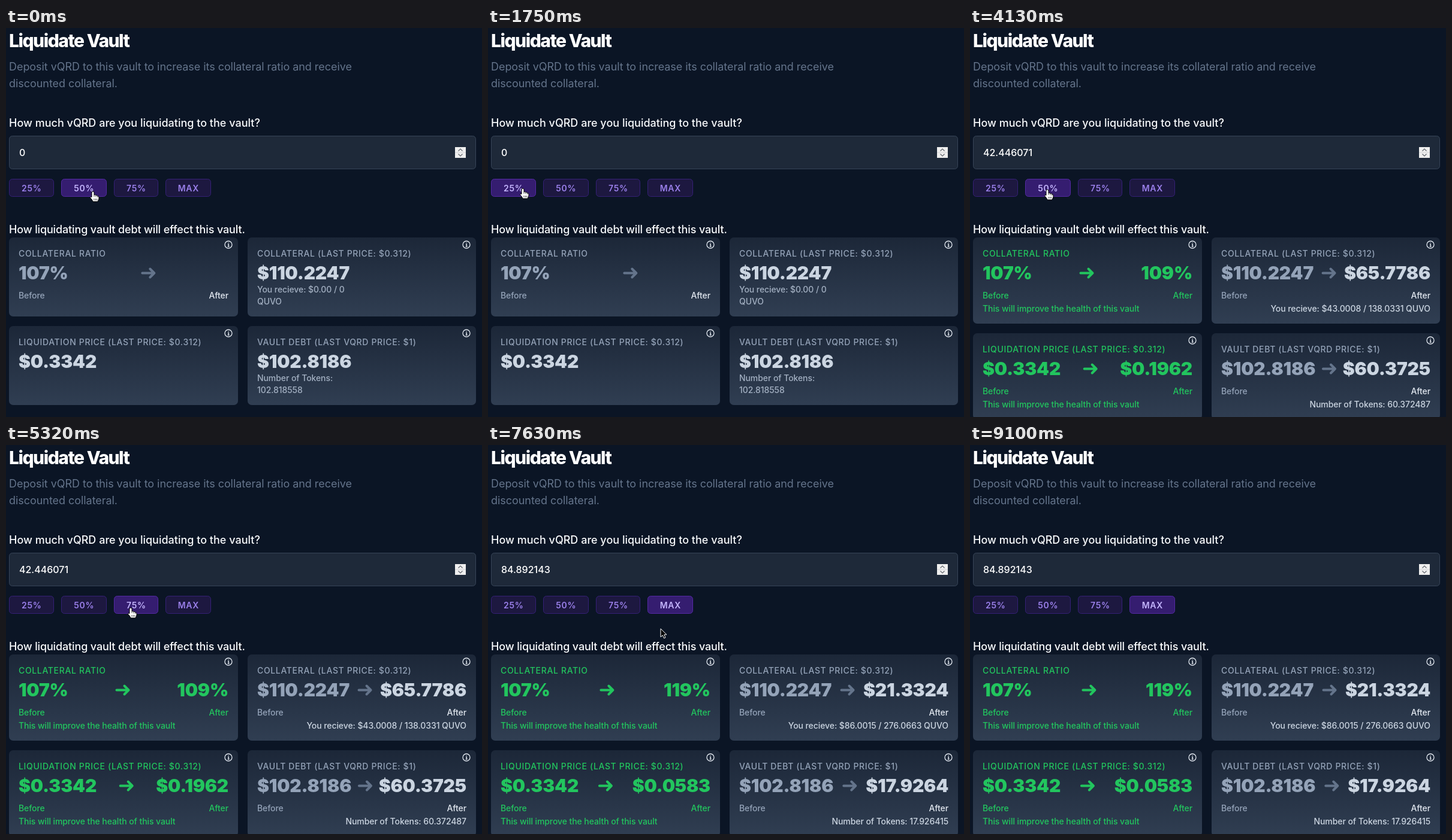
An HTML page that plays this animation: 794x650 px, repeating every 9170 ms.

```html
<!DOCTYPE html>
<html lang="en">
<head>
<meta charset="utf-8">
<title>Liquidate Vault</title>
<style>
html, body { margin: 0; width: 100%; height: 100%; overflow: hidden; background: #0b1525; }
svg { display: block; width: 794px; height: 650px; }
text { font-family: Inter, "Open Sans", sans-serif; font-weight: 500; font-optical-sizing: none; white-space: pre; }
.title { font-size: 30px; font-weight: 800; letter-spacing: -.05em; fill: #fff; }
.lead { font-size: 18px; font-weight: 400; letter-spacing: -.05px; fill: #64748b; }
.head { font-size: 18px; fill: #f8fafc; }
.tight { letter-spacing: -.14px; }
.input { font-size: 16px; fill: #fff; }
.btn { font-size: 14px; font-weight: 600; letter-spacing: .05em; text-anchor: middle; }
.cap { font-size: 14px; letter-spacing: .65px; }
.big { font-size: 30px; font-weight: 900; letter-spacing: -.2px; }
.small { font-size: 14px; letter-spacing: -.08px; }
.tip { font-size: 14px; letter-spacing: .4px; fill: #0f172a; }
</style>
</head>
<body>
<svg viewBox="0 0 794 650">
  <defs>
    <linearGradient id="shade" x2="0" y2="1">
      <stop stop-color="#1c2738"/><stop offset="1" stop-color="#303e52"/>
    </linearGradient>
  </defs>
  <rect width="794" height="650" fill="#0b1525"/>
  <text class="title" x="5" y="32">Liquidate Vault</text>
  <text class="lead" x="5" y="71">Deposit vQRD to this vault to increase its collateral ratio and receive</text>
  <text class="lead" x="5" y="99">discounted collateral.</text>
  <text class="head" x="5" y="165">How much vQRD are you liquidating to the vault?</text>
  <rect x="5.5" y="180.5" width="778" height="55" rx="5" fill="#1e2939" stroke="#374457"/>
  <text class="input" id="amount" x="22" y="214"></text>
  <rect x="749" y="199" width="18" height="18" fill="#efefef"/>
  <path d="M749 208H767" stroke="#d4d4d8"/>
  <path d="M754.5 205.5L758 202L761.5 205.5M754.5 210.5L758 214L761.5 210.5" fill="none" stroke="#62666d" stroke-width="1.2"/>
  <g id="buttons"></g>
  <text class="head tight" x="5" y="343">How liquidating vault debt will effect this vault.</text>
  <g id="cards"></g>
  <g id="tooltip">
    <path d="M190 339L196 345L202 339Z" fill="#94a3b8"/>
    <rect x="5" y="292" width="382" height="48" rx="5" fill="#94a3b8"/>
    <text class="tip" x="21" y="314">This is the collateral ratio of this vault. It can be</text>
    <text class="tip" x="21" y="330">liquidated up to 120%</text>
  </g>
  <g id="cursor">
    <g id="hand" transform="translate(1 1)" fill="#fff" stroke="#000" stroke-linejoin="round">
      <path d="M-2 1Q-2 -1 0 -1T2 1V5Q4 4 5 5.6Q7 5 7.8 6.8Q10 6.6 10 9V11Q9.500 13 8 16H0Q-1 13 -4.500 9.500Q-4.500 7 -2 8.500Z"/>
      <path d="M2 5V8M5 6V8.500M7.700 7V9M2 11V14M4.500 11V14M6.800 11V14" stroke-width=".7"/>
    </g>
    <path id="arrow" d="M0 0V14L3.300 11L5.500 16L8 15L5.800 10H10Z" fill="#000" stroke="#fff"/>
    <g id="help">
      <circle r="7.300" fill="#000" stroke="#fff" stroke-width="1.300"/>
      <text y="4.700" text-anchor="middle" font-size="13" style="font-weight:700" fill="#fff">?</text>
    </g>
  </g>
</svg>
<script>
const LOOP = 9170;
const GREEN = '#22c55e', MUTED = '#94a3b8', LIGHT = '#cbd5e1', DIM = '#64748b', PALE = '#e2e8f0';
const $ = id => document.getElementById(id);

const steps = [
  { at: 0, amount: '0' },
  { at: 2450, amount: '21.223035', ratio: '108%', price: '$0.2652', coll: '$88.0017', get: '$21.5004 / 69.0166', debt: '$81.5955', tokens: '81.595523' },
  { at: 4100, amount: '42.446071', ratio: '109%', price: '$0.1962', coll: '$65.7786', get: '$43.0008 / 138.0331', debt: '$60.3725', tokens: '60.372487' },
  { at: 5750, amount: '63.669107', ratio: '111%', price: '$0.1272', coll: '$43.5555', get: '$64.5012 / 207.0497', debt: '$39.1495', tokens: '39.149451' },
  { at: 7250, amount: '84.892143', ratio: '119%', price: '$0.0583', coll: '$21.3324', get: '$86.0015 / 276.0663', debt: '$17.9264', tokens: '17.926415' }
];

const buttons = [['25%', 5, 75], ['50%', 92, 76], ['75%', 180, 74], ['MAX', 266, 76]];

// Pointer stops: time, x, y
const path = [
  [0, 144, 273], [700, 144, 273], [1300, 57, 268], [2700, 57, 268],
  [3150, 80.6, 274], [3500, 128, 270], [4500, 128, 270], [5000, 207, 272],
  [6000, 207, 272], [6500, 279, 273], [7450, 279, 273], [7850, 300, 352],
  [8250, 327, 483], [8400, 327, 483], [8600, 345, 560], [8750, 360, 670], [LOOP, 360, 670]
];

const label = (cls, x, y, fill, str, end) =>
  `<text class="${cls}" x="${x}" y="${y}" fill="${fill}"${end ? ' text-anchor="end"' : ''}>${str}</text>`;

function card(x, y, w, h, title, tone, body) {
  return `<g transform="translate(${x} ${y})">
    <rect width="${w}" height="${h}" rx="7" fill="url(#shade)"/>
    <g transform="translate(${w - 16} 12)" fill="none" stroke="${PALE}" stroke-width="1.3">
      <circle r="6"/><path d="M-1 -.5H.3V3M-1.300 3H1.600M-.5 -2.800H.7"/>
    </g>
    ${label('cap', 16, 32, tone, title)}${body}</g>`;
}

// Before and after values with an arrow midway between them
function change(w, before, after, tones) {
  const [first, arrow, last] = tones;
  return label('big before', 16, 70, first, before) + label('big after', w - 16, 70, last, after, true) +
    `<path class="mid" d="M-10 0H10M3 -7L10 0L3 7" fill="none" stroke="${arrow}" stroke-width="4" stroke-linecap="round" stroke-linejoin="round"/>` +
    label('small', 16, 102, first, 'Before') + label('small', w - 16, 102, last === LIGHT ? PALE : last, 'After', true);
}

function drawCards(s) {
  const on = !!s.ratio, h = on ? 144 : 132, low = 350 + h + 16;
  const greens = [GREEN, GREEN, GREEN], greys = [MUTED, DIM, LIGHT];
  const tone = on ? GREEN : MUTED;
  const note = on ? label('small', 16, 124, GREEN, 'This will improve the health of this vault') : '';
  const left = (y, title, body) => card(5, y, 382, h, title, tone, body + note);
  const right = (y, title, body) => card(403, y, 381, h, title, MUTED, body);
  const asset = (before, after, note, lines) => on
    ? change(381, before, after, greys) + label('small', 365, 124, LIGHT, note, true)
    : label('big', 16, 70, LIGHT, before) + lines.map((t, i) => label('small', 16, 92 + 20 * i, '#a3b0c2', t)).join('');
  $('cards').innerHTML =
    left(350, 'COLLATERAL RATIO', change(382, '107%', s.ratio || '', on ? greens : greys)) +
    right(350, 'COLLATERAL (LAST PRICE: $0.312)',
      asset('$110.2247', s.coll, `You recieve: ${s.get} QUVO`, ['You recieve: $0.00 / 0', 'QUVO'])) +
    left(low, 'LIQUIDATION PRICE (LAST PRICE: $0.312)',
      on ? change(382, '$0.3342', s.price, greens) : label('big', 16, 70, LIGHT, '$0.3342')) +
    right(low, 'VAULT DEBT (LAST VQRD PRICE: $1)',
      asset('$102.8186', s.debt, `Number of Tokens: ${s.tokens}`, ['Number of Tokens:', '102.818558']));
  for (const mid of document.querySelectorAll('.mid')) {
    const g = mid.parentNode;
    const a = g.querySelector('.before'), b = g.querySelector('.after');
    const x = (16 + a.getComputedTextLength() + +b.getAttribute('x') - b.getComputedTextLength()) / 2;
    mid.setAttribute('transform', `translate(${x} 59.5)`);
  }
  $('amount').textContent = s.amount;
}

$('buttons').innerHTML = buttons.map(([name, x, w]) =>
  `<g><rect x="${x + .5}" y="252.5" width="${w - 1}" height="29" rx="5"/>
  <text class="btn" x="${x + w / 2 + .35}" y="273">${name}</text></g>`).join('');

function pointer(t) {
  const i = path.findIndex(p => p[0] > t);
  const [t0, x0, y0] = path[i - 1], [t1, x1, y1] = path[i];
  const k = (t - t0) / (t1 - t0), e = k * k * (3 - 2 * k);
  return [x0 + (x1 - x0) * e, y0 + (y1 - y0) * e];
}

const show = (id, yes) => $(id).setAttribute('visibility', yes ? 'visible' : 'hidden');
let current;

function render(t) {
  const s = steps.filter(p => p.at <= t).pop();
  if (s !== current) drawCards(current = s);
  const [x, y] = pointer(t);
  const over = buttons.findIndex(b => x >= b[1] && x <= b[1] + b[2] + 1 && y >= 252 && y <= 282);
  const lit = t >= 7250 ? 3 : over;
  [...$('buttons').children].forEach((g, i) => {
    const [box, text] = g.children;
    box.setAttribute('fill', i === lit ? '#351d70' : '#1d1840');
    box.setAttribute('stroke', i === lit ? '#5429a3' : '#352076');
    text.setAttribute('fill', i === lit ? '#c4b5fd' : '#9b80eb');
  });
  const inCard = x < 387 && y >= 350 && y <= 494;
  const asking = inCard || y >= 510;
  show('tooltip', inCard);
  show('hand', over >= 0);
  show('help', asking);
  show('arrow', over < 0 && !asking);
  $('cursor').setAttribute('transform', `translate(${x} ${y})`);
}

const start = performance.now();
function tick() {
  render((performance.now() - start) % LOOP);
  requestAnimationFrame(tick);
}
tick();
</script>
</body>
</html>
```
